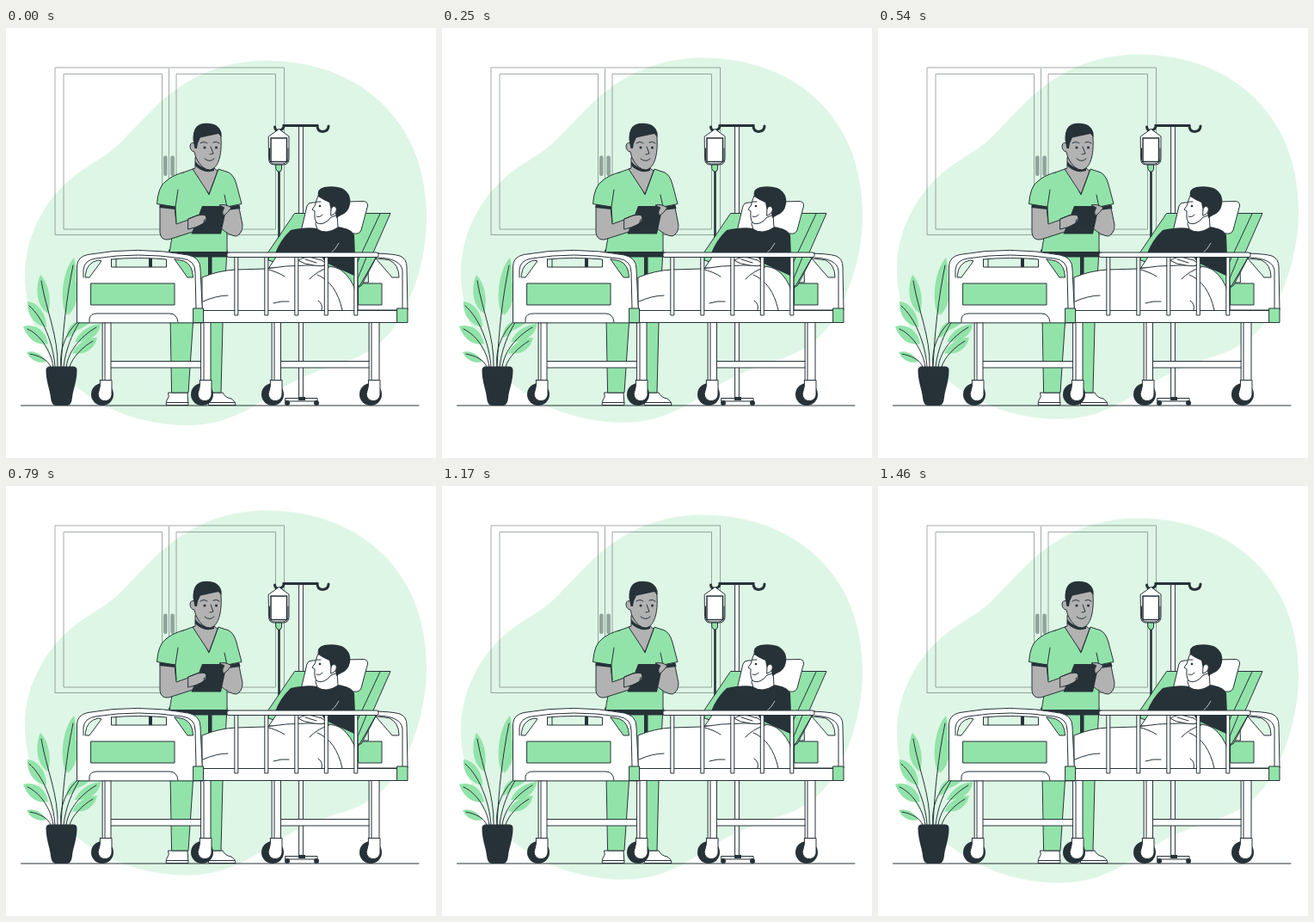
An HTML page for the animation above (1.5 s loop, 500 px wide and 500 px high).

```html
<!DOCTYPE html>
<html lang="en">
<head>
<meta charset="utf-8">
<title>Hospital visit</title>
<style>
  html, body { margin: 0; width: 100%; height: 100%; overflow: hidden; background: #fff; }
  svg { display: block; width: 100vw; height: 100vh; }
  .w, .g, .s, .l { stroke: #263238; stroke-width: 1; stroke-linejoin: round; stroke-linecap: round; }
  .w { fill: #fff; }
  .g { fill: #92e3a9; }
  .s { fill: #b2b2b2; }
  .l { fill: none; }
  .d { fill: #263238; }
  .leaf { fill: #92e3a9; }
  .cabinet { fill: none; stroke: #263238; opacity: .42; }
  .cabinet .handle { fill: #263238; stroke: none; }
</style>
</head>
<body>
<svg viewBox="0 0 500 500">
  <defs>
    <g id="caster">
      <circle class="d" cx="0" cy="426" r="13"/>
      <path class="w" d="M-2.500 409.500H11V427A8 8 0 1 1 -4 422Q-2 417 -2.500 409.500Z"/>
    </g>
    <path id="post" class="w" d="M-1.800 266H1.800V334H-1.800Z"/>
  </defs>

  <path id="blob" fill="#def6e5" d="M303 38C408 38 489 105 489 220C489 262 478 295 467 320C452 355 430 375 400 386C368 396 341 406 314 423C284 443 256 462 210 462C150 462 95 436 62 398C36 366 22 325 22 288C22 237 50 190 92 163C112 150 124 144 140 126C165 101 178 84 206 66C238 45 272 38 303 38Z"/>

  <g class="cabinet">
    <path d="M57 46H323.500V240.500H57ZM189.500 47V240M67 53.500H181.500V234H67ZM198 53.500H313.500V234H198Z"/>
    <rect class="handle" x="183" y="148.500" width="4.600" height="23.500" rx="2"/>
    <rect class="handle" x="191.300" y="148.500" width="4.600" height="23.500" rx="2"/>
  </g>

  <g id="plant">
    <g class="leaf">
      <path d="M79 267C84 284 82 318 70 334C62 318 65 283 79 267Z"/>
      <path d="M40 287C50 297 53 317 49 332C36 325 33 303 40 287Z"/>
      <path d="M82 295C86 310 81 327 72 334C70 318 74 304 82 295Z"/>
      <path d="M25 318C37 319 47 332 47 348C32 345 24 333 25 318Z"/>
      <path d="M20 347C34 343 46 352 49 367C35 370 25 361 20 347Z"/>
      <path d="M24 377C33 374 43 380 47 388C38 391 28 386 24 377Z"/>
      <path d="M106 313C111 331 99 346 81 352C80 336 91 320 106 313Z"/>
      <path d="M86 340C85 350 79 358 71 360C70 350 77 342 86 340Z"/>
      <path d="M110 344C109 358 95 366 80 365C85 352 98 345 110 344Z"/>
      <path d="M106 360C103 374 91 381 77 378C82 367 94 360 106 360Z"/>
    </g>
    <path class="l" d="M64 394C66 353 70 315 78 276M60 394C61 358 47 330 41 294M57 394C55 366 43 337 27 323M55 394C52 374 39 356 25 350M52 394C49 386 39 381 28 379M67 394C70 367 83 341 102 319M70 394C73 374 88 358 105 348M74 394C77 383 89 371 101 364M64 394C62 376 68 357 82 343"/>
    <path class="d" d="M46.500 398Q46.500 393.500 51 393.500H78Q82.500 393.500 82.500 398C82.500 411 78 420 77 430Q76 439 71 439H58Q53 439 52 430C51 420 46.500 411 46.500 398Z"/>
  </g>

  <g id="drip">
    <path class="w" d="M341 114H345.400V432H341Z"/>
    <path fill="none" stroke="#263238" stroke-width="3" stroke-linecap="round" d="M312.500 115Q313 120 318 119Q323 118 323 113.500H362Q362 120 368 120.500Q375 120 375 114"/>
    <path class="w" d="M325 430.500H362V434H325Z"/>
    <path class="d" d="M340 429H348V433H340Z"/>
    <circle class="d" cx="327" cy="436" r="3"/>
    <circle class="d" cx="361" cy="436" r="3"/>
    <path class="w" d="M305.500 126L317.500 117.500L329 126V152Q329 159 322 159H312Q305.500 159 305.500 152Z"/>
    <path d="M308 128H326.500V155.500H308Z" fill="#fff" stroke="#263238" stroke-width="1.500"/>
    <path class="l" d="M306.500 140V153Q307 158 313 158H322Q328 157 328 152V140" stroke-width="1.800"/>
    <path class="g" d="M314 159H320.500V164L319 167H316L314 164Z"/>
    <path class="d" d="M316.200 167H318.800V250H316.200Z"/>
  </g>

  <g id="nurse">
    <path class="w" d="M189 424H211L212 438.500H186Q186 433 189 429Z"/>
    <path class="w" d="M236 424H252Q255 430 262 431Q267 434 267 438.500H236Z"/>
    <path class="l" d="M187 435.500H212M236 435.500H266"/>
    <path class="g" d="M190 258H257L252 343L250 424H238L229 320H219L212 424H193Z"/>
    <path class="g" d="M206 168L220 163L236 194L247 164L259 168Q265 171 268 182L274 204.500L257 208L257 262H190Q193 239 198 225L197 208L175.500 204.500Q177 184 186 178Q194 171 206 168Z"/>
    <path class="l" d="M197 208L200 188M257 208L254 194"/>
    <path class="s" d="M179 208L179 238Q180 247 189 246L222 235.500L232 225Q234 218 226 218L198 228L196 208Z"/>
    <path class="s" d="M258 210L271 209L275 229Q275 239 268 242Q260 242 249 232L253 214Z"/>
    <path class="d" d="M178.500 205L197 208V211L178.500 209ZM257 208L271.500 205.500L272.500 210L257 212Z"/>
    <path class="s" d="M220 151V163L217 164L236 193L246 166L242 163V155Z"/>
    <path class="d" d="M220 155Q230 167 242 162V166Q230 170 220 160Z"/>
    <path class="s" d="M219 122H249.500C252 144 248 163 237 165Q228 165 221 151L219 144Q214 143 214 137Q215 132 219 134Z"/>
    <path class="d" d="M219.500 140L217.500 130Q217 113 229 111Q247 109 250.500 122V127L247 123L226 127.500L223 134L222 140Z"/>
    <path class="l" d="M226 134Q230 131 234 134M241 133Q245 131 248 134" stroke-width="1.700"/>
    <path class="l" d="M238 138L241 146L237 147M231 152Q237 157 242 152"/>
    <circle class="d" cx="231" cy="139" r="1.500"/>
    <circle class="d" cx="244.500" cy="139" r="1.500"/>
    <path class="d" d="M228 207H257L250 239.500H215.500Z"/>
    <path class="s" d="M212 222L222 218Q227 215 232 218Q235 223 230 227L223 231L212 234Z" stroke="none"/>
    <path class="l" d="M212 222L222 218L231 217Q236 221 230 224M231 224L229 228L222 231"/>
    <path class="s" d="M253 218Q250 214 254 209L248 206Q255 204 262 209L258 214Z"/>
  </g>

  <g id="back-rail" class="d">
    <path d="M190 260H258V266.500H190ZM166 264H170V330H166ZM235 264H239.500V300H235Z"/>
  </g>

  <g id="patient">
    <path class="g" d="M336 215.500H447L409 302L305 270V261Z"/>
    <path class="l" d="M435 216L405 280"/>
    <path class="w" d="M344 232L350 207Q351 203 356 203L415 201.500Q421 201.500 420.500 207L413 235Q411 240 405 239L347 237Z"/>
    <path class="d" d="M331 235Q349 231 362 233L385 231Q402 233 405 241L407 289L370 272L312 264Q319 246 331 235Z"/>
    <path class="w" d="M360 228L362 234Q372 241 386 232L385 216L364 218Z"/>
    <path class="w" d="M363 195Q360 202 359.500 206L356 211L359 213Q358 224 362 227Q370 230 378 220L386 217L388 205L378 195Z"/>
    <path class="d" d="M363 196Q361 187 370 185Q381 183 390 186Q402 192 400 205Q398 215 389 218L384 221L383 215Q386 209 382 207L378 213L376 203Q369 200 363 196Z"/>
    <path class="w" d="M378 211Q379 206 383 208Q386 211 382 216L378 218Z"/>
    <path class="l" d="M361 202L366 202M361 219Q365 221 368 217"/>
    <circle class="d" cx="365" cy="207" r="1.300"/>
    <path d="M387 250Q383 258 377 262" fill="none" stroke="#fff" stroke-width=".7"/>
    <path class="w" d="M316 264H366L373 274L360 279H306Z"/>
  </g>

  <path class="w" d="M228 330V290Q247 282 267 281L302 280Q325 276 350 276Q379 275 389 281Q402 290 408 310V330Z"/>
  <path class="l" d="M302 280Q317 284 324 289M376 278Q361 283 353 292M362 287Q384 296 391 328M229 318Q245 311 258 311M311 320Q320 317 329 318M363 317Q369 321 367 328"/>
  <path class="w" d="M340 270Q348 265 356 267L367 270L374 275Q367 278 358 276L348 274Z"/>
  <path class="l" d="M348 269L361 273"/>

  <g id="headboard">
    <path class="w" fill-rule="evenodd" d="M421 262Q449 262 458 265Q466 268 466 278L467 328H409V296H421ZM430 268L449 290H457Q457 275 446 270Z"/>
    <path class="l" d="M433 267Q459 268 461 282V326"/>
    <path class="g" d="M410 297H437V322H410Z"/>
    <path class="g" d="M433 262L413 300H409V291L421 262Z" stroke="none"/>
    <path class="l" d="M433 262L410 302"/>
  </g>

  <g id="frame">
    <path class="w" d="M115 387.500H230V395H115ZM313 387.500H428V395H313Z"/>
    <path class="w" d="M112.500 342H122V410H112.500ZM227 342H238V410H227ZM309.500 342H319.500V410H309.500ZM422.500 342H434V410H422.500Z"/>
    <path class="l" d="M115 342V410M230 342V410M312 342V410M425 342V410"/>
    <use href="#caster" x="112"/>
    <use href="#caster" x="228"/>
    <use href="#caster" x="310"/>
    <use href="#caster" x="424"/>
    <path class="w" d="M228 328.500H466V342.500H228Z"/>
    <path class="g" d="M455 326H467V342.500H455Z"/>
  </g>

  <g id="rail">
    <use href="#post" x="268"/>
    <use href="#post" x="303"/>
    <use href="#post" x="338"/>
    <use href="#post" x="372.500"/>
    <use href="#post" x="407"/>
    <rect class="w" x="257" y="261" width="176" height="5.500" rx="2"/>
  </g>

  <g id="footboard">
    <path class="w" fill-rule="evenodd" d="M82.500 342.500V277Q83 266 95 263.500Q153 253 212 264Q226 267 226 280L229 342.500ZM92.500 290H97L111 271L107 270Q94 273 92.500 286ZM122.500 269V278H186.500V269Q153 266 122.500 269ZM196 269L211 290H217.500Q217 275 207 271Z"/>
    <path class="l" d="M90 290V281Q91 270 104 268Q153 260 205 268Q220 270 220 284L221 326M128 269V278"/>
    <path class="g" d="M99 297H196V322H99Z"/>
    <path class="l" d="M97 342V338Q98 332 106 332H190Q199 332 200 342"/>
    <path class="g" d="M218 326H229.500V342.500H218Z"/>
  </g>

  <path class="l" d="M17.500 439H480"/>
</svg>
<script>
  const float = [0, -10, 0].map(y => ({ transform: `translateY(${y}px)` }));
  document.getElementById('blob').animate(float, { duration: 1500, iterations: Infinity });
</script>
</body>
</html>
```
